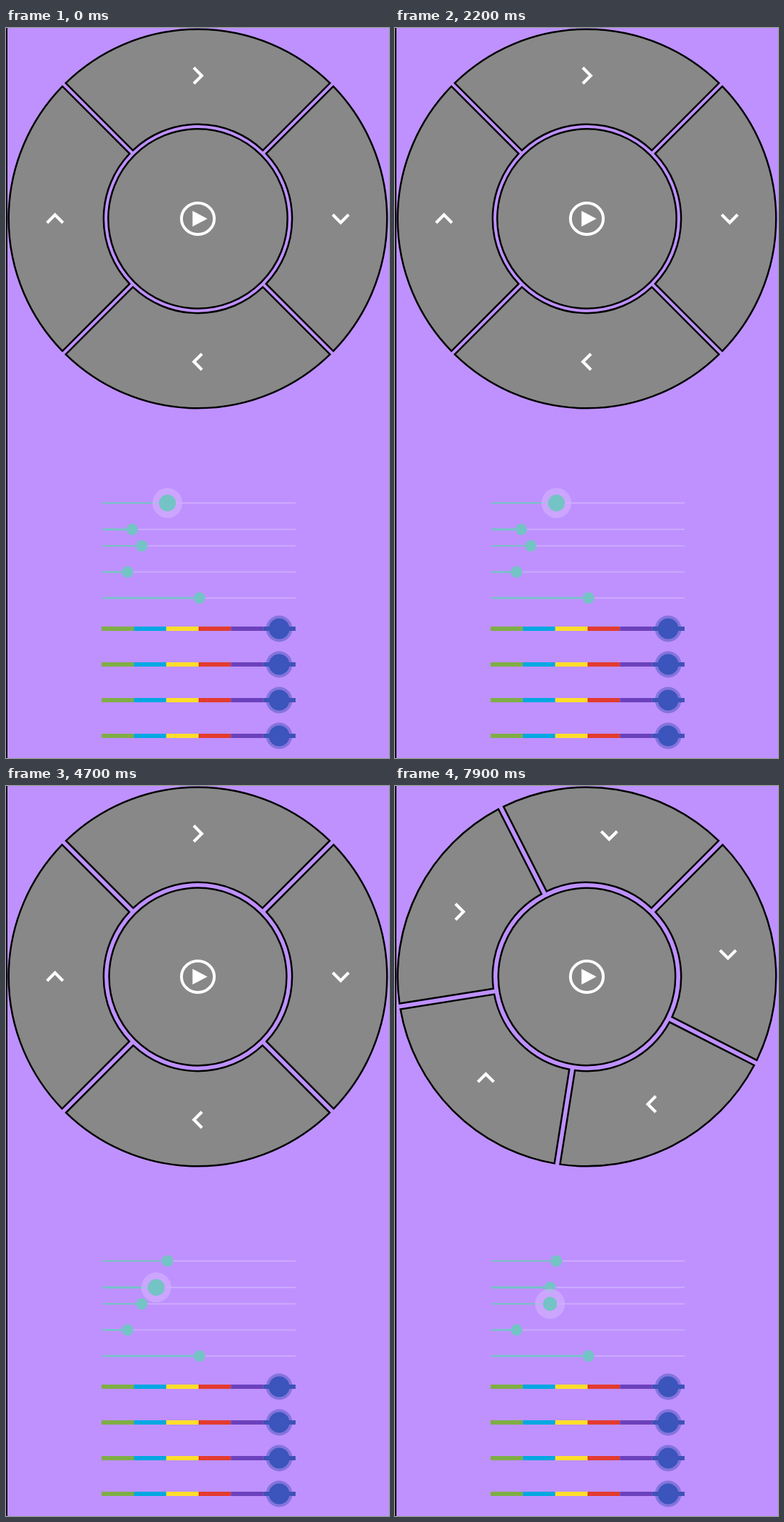
Animation, 537 px wide and 1022 px high, one loop 8 s. Source, as an HTML page:

```html
<!DOCTYPE html>
<html lang="en">
<head>
<meta charset="utf-8">
<title>Wheel controls</title>
<style>
  html, body { margin: 0; width: 100%; height: 100%; overflow: hidden; background: #be91ff; }
  svg { display: block; width: 537px; height: 1022px; }
</style>
</head>
<body>
<svg id="stage" viewBox="0 0 537 1022">
  <rect width="537" height="1022" fill="#be91ff"/>
  <rect width="2" height="1022" fill="#000"/>
  <g id="wheel">
    <path id="wedges" fill="#888" stroke="#000"/>
    <circle id="hub" fill="#888" stroke="#000"/>
    <g id="icons" fill="#fff"></g>
    <ellipse rx="23" ry="22" fill="none" stroke="#fff" stroke-width="4"/>
    <path d="M-7.5-11L13.5 0L-7.5 11Z" fill="#fff"/>
  </g>
  <g id="sliders"></g>
  <g id="bars"></g>
</svg>
<script>
const LOOP = 8000, STEP = 100;
const TEAL = '#74c3c5', LEFT = 136.5, SPAN = 269.5;
const BAR_COLORS = ['#7fae45', '#00a8e1', '#ffde2b', '#e33b2f', '#6b41bc', '#3e52b8'];
const CHEVRON = 'M-2-6L-3.41-4.59L1.17 0L-3.41 4.59L-2 6L4 0Z';

// keys: [ms, value]; press: [down, up] in ms
const sliders = [
  { y: 665, h: 2, min: 0, max: 15, press: [-300, 2300],
    keys: [[0, 5], [100, 5], [650, 8], [950, 8], [1200, 9], [1450, 8], [1600, 8], [2200, 5]] },
  { y: 702, h: 3, min: 0, max: 40, press: [2500, 5150],
    keys: [[2600, 6], [3000, 10], [3550, 30], [3800, 30], [4500, 11], [4800, 11], [5000, 12]] },
  { y: 725, h: 2, min: 2, max: 12, press: [5400, 7800],
    keys: [[5500, 4], [6400, 8], [6650, 9], [6900, 8], [7050, 8], [7700, 5]] },
  { y: 761.5, h: 2.6, min: 0, max: 1, fixed: 0.126 },
  { y: 798, h: 2.6, min: 0, max: 1, fixed: 0.5 }
];

const $ = id => document.getElementById(id);
const clamp = x => Math.max(0, Math.min(1, x));

function add(parent, tag, attrs) {
  const el = document.createElementNS('http://www.w3.org/2000/svg', tag);
  set(el, attrs);
  return parent.appendChild(el);
}

function set(el, attrs) {
  for (const k in attrs) el.setAttribute(k, attrs[k]);
}

function valueAt(s, t) {
  if (!s.keys) return s.fixed;
  let [t0, v0] = s.keys[0];
  for (const [t1, v1] of s.keys) {
    if (t < t1) return Math.round(v0 + (v1 - v0) * clamp((t - t0) / (t1 - t0)));
    t0 = t1;
    v0 = v1;
  }
  return v0;
}

function pressAt(s, t) {
  if (!s.press) return 0;
  return Math.min(clamp((t - s.press[0]) / 200), 1 - clamp((t - s.press[1]) / 200));
}

for (const s of sliders) {
  const g = $('sliders'), y = s.y - s.h / 2;
  add(g, 'rect', { x: LEFT - 1, y: s.y - 1.1, width: SPAN + 1, height: 2.2, fill: '#cca8ff' });
  s.fill = add(g, 'rect', { x: LEFT - 1, y, height: s.h, fill: TEAL });
  s.halo = add(g, 'circle', { cy: s.y, r: 21, fill: '#d2adff', 'fill-opacity': 0.72 });
  s.thumb = add(g, 'circle', { cy: s.y, fill: TEAL });
}

for (let row = 0; row < 4; row++) {
  const g = $('bars'), y = 841 + row * 50, w = 272 / 6;
  BAR_COLORS.forEach((fill, i) =>
    add(g, 'rect', { x: 134 + i * w, y: y - 3, width: w, height: 6, fill }));
  add(g, 'circle', { cx: 383, cy: y, r: 18.5, fill: '#3f51b5', 'fill-opacity': 0.46 });
  add(g, 'circle', { cx: 383, cy: y, r: 14.5, fill: '#3b55bc' });
}

const icons = Array.from({ length: 12 }, () => add($('icons'), 'path', { d: CHEVRON }));

const polar = (r, a) => [r * Math.cos(a), r * Math.sin(a)];
const point = (r, a) => polar(r, a).map(v => v.toFixed(2)).join(' ');

function wedge(a0, a1, inner, outer, half) {
  const o = Math.asin(half / outer), i = Math.asin(half / inner);
  const large = a1 - a0 - 2 * o > Math.PI ? 1 : 0;
  return `M${point(outer, a0 + o)}A${outer} ${outer} 0 ${large} 1 ${point(outer, a1 - o)}` +
    `L${point(inner, a1 - i)}A${inner} ${inner} 0 ${large} 0 ${point(inner, a0 + i)}Z`;
}

function drawWheel(stroke, spacing, count) {
  const d = stroke - 2.5;
  const outer = 265.3 - 1.5 * d, inner = outer / 2 - 0.5;
  const gap = 2 * stroke + spacing / 4;
  const turn = 2 * Math.PI / count;
  set($('wheel'), { transform: `translate(${269 - d} ${267 - d})` });

  let path = '';
  icons.forEach((icon, i) => {
    const on = i < count, a = -Math.PI / 4 + i * turn;
    icon.style.display = on ? '' : 'none';
    if (!on) return;
    path += wedge(a, a + turn, inner, outer, gap / 2);
    set(icon, {
      transform: `translate(${point(outer * 0.755, a + turn / 2)}) rotate(${90 * (i + 1)}) scale(2.1)`
    });
  });
  set($('wedges'), { d: path, 'stroke-width': stroke });
  set($('hub'), { r: inner - gap, 'stroke-width': stroke });
}

function draw(t) {
  const values = sliders.map(s => {
    const v = valueAt(s, t), p = pressAt(s, t);
    const x = LEFT + SPAN * (v - s.min) / (s.max - s.min);
    set(s.fill, { width: x - LEFT + 1 });
    set(s.halo, { cx: x, opacity: Math.min(1, 2 * p) });
    set(s.thumb, { cx: x, r: 8 + 3.8 * p });
    return v;
  });
  drawWheel(values[0] / 2, values[1], values[2]);
}

const start = performance.now();
function tick() {
  const t = (performance.now() - start) % LOOP;
  draw(Math.floor(t / STEP) * STEP);
  requestAnimationFrame(tick);
}
tick();
</script>
</body>
</html>
```
